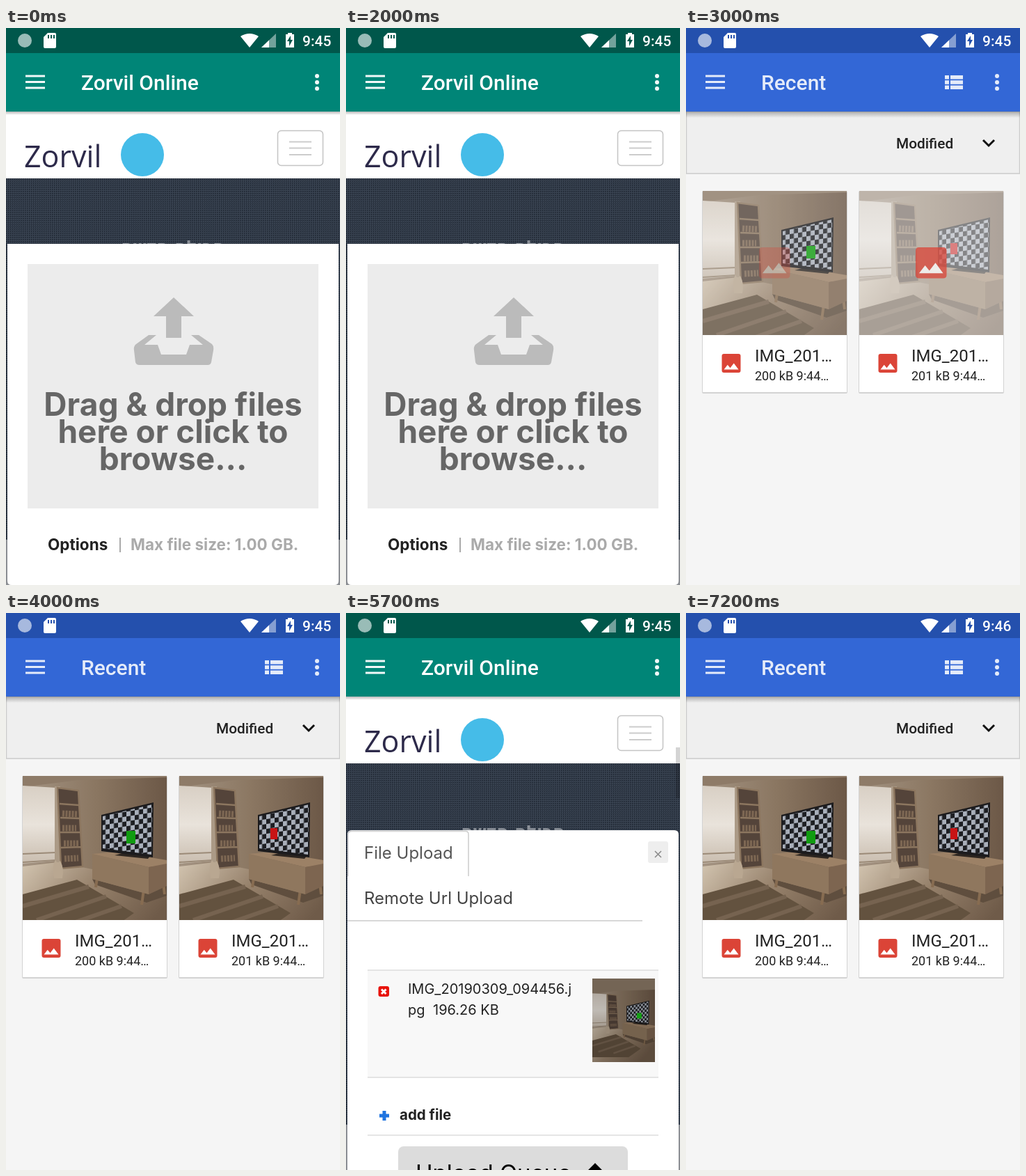
An HTML page for the animation above (8000 ms loop, 480x800 px).

```html
<!DOCTYPE html>
<html lang="en">
<head>
<meta charset="utf-8">
<title>File upload</title>
<style>
  html, body { margin: 0; width: 100%; height: 100%; overflow: hidden; }
  svg { display: block; width: 100%; height: 100%; }
  text { font-family: Roboto, sans-serif; fill: #222; }
  .panel text { font-family: Inter, sans-serif; }
  .panel .drop { font-size: 46px; font-weight: 700; fill: #666; text-anchor: middle; }
  .panel .tab { font-size: 24px; fill: #555; }
  .panel .bold { font-size: 22.5px; font-weight: 700; }
  .title { font-size: 30px; font-weight: 500; fill: #fff; }
  .rule { stroke: #ddd; stroke-width: 1.5; fill: none; }
</style>
</head>
<body>
<svg viewBox="0 0 480 800">
  <defs>
    <pattern id="mesh" width="3" height="3" patternUnits="userSpaceOnUse">
      <rect width="3" height="3" fill="#384250"/>
      <path d="M0 0h2v1h-1v1h-1z" fill="#222a36"/>
    </pattern>
    <pattern id="checks" width="12" height="14" patternUnits="userSpaceOnUse" patternTransform="translate(113 57) skewY(-9)">
      <rect width="12" height="14" fill="#1d1e22"/>
      <path d="M0 0h6v14h6v-7h-12z" fill="#a9afba"/>
    </pattern>
    <linearGradient id="wall">
      <stop offset="0" stop-color="#a39382"/><stop offset=".5" stop-color="#8b7762"/><stop offset="1" stop-color="#6c5847"/>
    </linearGradient>
    <linearGradient id="floor" x2="1" y2=".5">
      <stop offset="0" stop-color="#d2c4b0"/><stop offset=".5" stop-color="#96816b"/><stop offset="1" stop-color="#6f5b49"/>
    </linearGradient>
    <linearGradient id="sky" x2="0" y2="1">
      <stop offset="0" stop-color="#d8cfc4"/><stop offset=".5" stop-color="#e9e3db"/><stop offset="1" stop-color="#c9bdaf"/>
    </linearGradient>
    <linearGradient id="shade" x2="0" y2="1">
      <stop offset="0" stop-opacity=".28"/><stop offset="1" stop-opacity="0"/>
    </linearGradient>

    <g id="room">
      <path d="M0-40H207V245H0z" fill="url(#wall)"/>
      <path d="M0-40H207V2L80 6 0 16z" fill="#8e7b68"/>
      <path d="M0 14L48 17V122L0 126z" fill="url(#sky)"/>
      <path d="M0 112L48 110M0 124L48 121" stroke="#9b8a77" stroke-width="2"/>
      <path d="M46 15h8V126h-8z" fill="#ab9a86"/>
      <path d="M0 130L50 124 110 136 207 168V245H0z" fill="url(#floor)"/>
      <path d="M50 17L80 21 86 130 55 133z" fill="#54443a"/>
      <path d="M50 17L80 21 86 130 55 133zM53 40l28 2M54 60l28 1M54 81l29 0M55 103l29-1" fill="none" stroke="#8c765f" stroke-width="2.500"/>
      <path d="M57 54l22 1M57 75l20 0M59 97l22 0M60 119l20-1" stroke="#7d6753" stroke-width="9" stroke-dasharray="3 1.500"/>
      <path d="M0 170L78 149 160 197 120 225H0z" fill="#63523f"/>
      <path d="M0 187L95 159M20 207L120 173M70 212L142 187" stroke="#766350" stroke-width="6"/>
      <path d="M45 147Q42 128 47 121l3 4 4-3Q60 133 57 147z" fill="#b9a791"/>
      <path d="M100 148L181 170 207 158V172L178 182 104 156z" fill="#5f4e3e"/>
      <path d="M107 146l-2 14M174 163l-3 22M202 154l2 16" stroke="#876c51" stroke-width="4"/>
      <path d="M100 112L135 109 207 121V128L181 131z" fill="#9c8166"/>
      <path d="M100 112L181 131V170L100 148z" fill="#8f775e"/>
      <path d="M181 131L207 126V158L181 170z" fill="#7d6550"/>
      <path d="M132 114L150 109 183 115 180 119z" fill="#2c2520"/>
      <path d="M113 56L188 38 187 117 113 108z" fill="#1c1b1d"/>
      <path d="M115 58L186 41 185 113 115 104z" fill="url(#checks)"/>
    </g>
    <g id="picture">
      <path d="M3 0H24Q27 0 27 3V24Q27 27 24 27H3Q0 27 0 24V3Q0 0 3 0z" fill="#db4437"/>
      <path d="M3 22.500L8.250 15.750 12 20.250 17.250 13.500 24 22.500z" fill="#fff"/>
    </g>
    <g id="menu">
      <path d="M28 69h28M28 77.500h28M28 86h28" stroke="#fff" stroke-width="3"/>
      <g fill="#fff"><circle cx="447" cy="69" r="3"/><circle cx="447" cy="78" r="3"/><circle cx="447" cy="87" r="3"/></g>
    </g>
    <g id="card">
      <rect x="-1" y="0" width="209" height="291" rx="2" fill="#d3d3d3"/>
      <rect width="207" height="289" fill="#fff"/>
      <rect width="207" height="207" fill="#efefef"/>
      <use href="#picture" x="27.500" y="234"/>
      <text x="75" y="245" font-size="24">IMG_201…</text>
    </g>
    <clipPath id="square"><path d="M0 0H207V207H0z"/></clipPath>
    <clipPath id="portrait"><path d="M0-35H207V241H0z"/></clipPath>
  </defs>

  <g>
    <path d="M0 0H480V800H0z" fill="#fff"/>
    <path d="M0 216H480V800H0z" fill="url(#mesh)"/>
    <path d="M0 735H480V800H0z" fill="#8c8f94"/>
    <text id="heading" x="240" y="323" text-anchor="middle" style="font:700 25px 'DejaVu Sans',sans-serif;fill:#8b9098">חבילה חדשה</text>
    <path d="M0 0H480V36H0z" fill="#00574b"/>
    <path d="M0 36H480V120H0z" fill="#008577"/>
    <path d="M0 120H480V125H0z" fill="url(#shade)"/>
    <use href="#menu" opacity=".95"/>
    <text x="108" y="89" class="title">Zorvil Online</text>
    <text x="26" y="200" style="font:43px 'Open Sans',sans-serif;fill:#2d2a4a">Zorvil</text>
    <circle cx="196" cy="182" r="31" fill="#45bce8"/>
    <rect x="390.500" y="147.500" width="65" height="50" rx="5" fill="#fff" stroke="#c4c4c4" stroke-width="1.500"/>
    <path d="M407 163.500h32M407 172.500h32M407 182h32" stroke="#ccc" stroke-width="2.200"/>

    <g id="dropView" class="panel">
      <path d="M2 310H478V794Q478 800 472 800H8Q2 800 2 794z" fill="#fff"/>
      <path d="M31 339H449V690H31z" fill="#ececec"/>
      <g fill="#bbb">
        <path d="M241 387L270 414H252V445H230V414H212z"/>
        <path d="M205 441H216L199 455H218L223 469H259L264 455H283L266 441H277L296 454Q299 457 298 463L295 480Q294 484 290 484H192Q187 484 186 480L184 463Q183 457 187 454z"/>
      </g>
      <text class="drop" x="240" y="557">Drag &amp; drop files</text>
      <text class="drop" x="240" y="596">here or click to</text>
      <text class="drop" x="240" y="635">browse...</text>
      <text class="bold" x="60" y="750">Options</text>
      <path d="M164 732v21" stroke="#aaa" stroke-width="2"/>
      <text class="bold" x="179" y="750" style="fill:#aaa">Max file size: 1.00 GB.</text>
    </g>

    <g id="listView" class="panel">
      <path d="M2 800V318Q2 312 8 312H472Q478 312 478 318V800z" fill="#fff"/>
      <path d="M3 378V318Q3 313.500 8 313.500H172Q176 313.500 176 318V378M2 442H426" class="rule" style="stroke:#ccc"/>
      <text class="tab" x="26" y="353">File Upload</text>
      <text class="tab" x="26" y="418" style="fill:#444">Remote Url Upload</text>
      <rect x="434" y="328" width="29" height="31" rx="3" fill="#eee"/>
      <path d="M444 342l9 9m0-9l-9 9" stroke="#888" stroke-width="1.500"/>
      <path d="M31 513H449V667H31z" fill="#f8f8f8"/>
      <path d="M31 513H449M31 667H449M31 750H449" class="rule"/>
      <rect x="46.500" y="536" width="15.500" height="15" rx="3" fill="#e8140c"/>
      <path d="M51 540.500l6.500 6.500m0-6.500l-6.500 6.500" stroke="#fff" stroke-width="3"/>
      <g font-size="20">
        <text x="89" y="547">IMG_20190309_094456.j</text>
        <text x="89" y="577">pg</text>
        <text x="125" y="577">196.26 KB</text>
      </g>
      <g transform="translate(354 540.200) scale(.4348)">
        <g clip-path="url(#portrait)">
          <use href="#room"/>
          <path d="M0-40H207V245H0z" opacity=".18"/>
          <path d="M147 79h16v18h-16z" fill="#14a014"/>
        </g>
      </g>
      <path d="M55 715v14M48 722h14" stroke="#1f74e0" stroke-width="5"/>
      <text class="bold" x="77" y="728" style="font-size:20.500px">add file</text>
      <rect x="75" y="766" width="330" height="60" rx="8" fill="#dcdcdc"/>
      <text x="100" y="816" style="font-size:33px;fill:#000">Upload Queue</text>
      <path d="M358 790L369 801H361V810H355V801H347z"/>
    </g>
    <path id="scrollbar" d="M474 193h6v73h-6z"/>
  </g>

  <g id="recent">
    <path d="M0 0H480V800H0z" fill="#f5f5f5"/>
    <path d="M0 0H480V36H0z" fill="#2450ad"/>
    <path d="M.5 120H479.500V209H.5z" fill="#efefef" stroke="#ccc" stroke-width="1.500"/>
    <path d="M0 36H480V120H0z" fill="#3367d6"/>
    <path d="M0 120H480V129H0z" fill="url(#shade)"/>
    <g opacity=".87">
      <use href="#menu"/>
      <text x="108" y="89" class="title">Recent</text>
      <path d="M372 68h6v5.500h-6zm8 0h18v5.500h-18zM372 75.300h6v5.500h-6zm8 0h18v5.500h-18zM372 82.600h6v5.500h-6zm8 0h18v5.500h-18z" fill="#fff"/>
    </g>
    <text x="302" y="173" font-size="20.800" font-weight="500">Modified</text>
    <path d="M427 161l8 8 8-8" fill="none" stroke="#111" stroke-width="3"/>
    <g transform="translate(24 234)">
      <use href="#card"/>
      <text x="75" y="272" font-size="18">200 kB 9:44…</text>
      <g class="photo" clip-path="url(#square)"><use href="#room"/><path d="M149 79h13v18h-13z" fill="#109c10"/></g>
      <use class="loading" href="#picture" transform="translate(81 81) scale(1.65)"/>
    </g>
    <g transform="translate(249 234)">
      <use href="#card"/>
      <text x="75" y="272" font-size="18">201 kB 9:44…</text>
      <g class="photo" clip-path="url(#square)"><use href="#room"/><path d="M131 75h10v16h-10z" fill="#c81414"/></g>
      <use class="loading" href="#picture" transform="translate(81 81) scale(1.65)"/>
    </g>
  </g>

  <g fill="#fff">
    <circle cx="27" cy="18" r="10" opacity=".6"/>
    <path fill-rule="evenodd" d="M60 7H70Q72 7 72 9V27Q72 29 70 29H56Q54 29 54 27V13zM60 10v5h2v-5zm4 0v5h2v-5zm4 0v5h2v-5z"/>
    <path d="M350 28L337 12Q350 4 363 12z"/>
    <path d="M367 28L388 8V28z" opacity=".45"/>
    <path d="M367 28L378 17.500V28z"/>
    <path fill-rule="evenodd" d="M405 9V7h6V9H414V28H402V9zM409 11L404 19H407V26L412 17H409z"/>
    <text id="clock" x="426" y="26" font-size="21" font-weight="500" style="fill:#fff">9:45</text>
  </g>
</svg>
<script>
  const LOOP = 8000, STEP = 100;
  const byId = id => document.getElementById(id);
  const photos = document.querySelectorAll('.photo');
  const icons = document.querySelectorAll('.loading');
  const ramp = (t, from, to) => Math.min(1, Math.max(0, (t - from) / (to - from)));
  const fade = (el, opacity) => el.setAttribute('opacity', opacity);
  const show = (el, visible) => el.setAttribute('display', visible ? 'inline' : 'none');

  function draw(t) {
    const picked = t >= 4200;
    show(byId('dropView'), !picked);
    show(byId('listView'), picked);
    fade(byId('scrollbar'), picked ? .34 * (1 - ramp(t, 5600, 5800)) : 0);
    fade(byId('heading'), 1 - ramp(t, 6000, 6200));
    byId('clock').textContent = t < 6600 ? '9:45' : '9:46';

    // The picker fades in while rising, and leaves the same way.
    const open = ramp(t, 2550, 2800) - ramp(t, 4000, 4300) + ramp(t, 6900, 7200);
    show(byId('recent'), open > 0);
    fade(byId('recent'), open);
    byId('recent').setAttribute('transform', `translate(0 ${64 * (1 - open) ** 2})`);

    photos.forEach((photo, i) => {
      const loaded = ramp(t, 2800 + 75 * i, 3050 + 75 * i);
      fade(photo, loaded);
      fade(icons[i], Math.min(1, 1.5 * (1 - loaded)));
    });
  }

  function tick() {
    const t = performance.now() % LOOP;
    draw(Math.floor(t / STEP) * STEP);
    requestAnimationFrame(tick);
  }
  tick();
</script>
</body>
</html>
```
